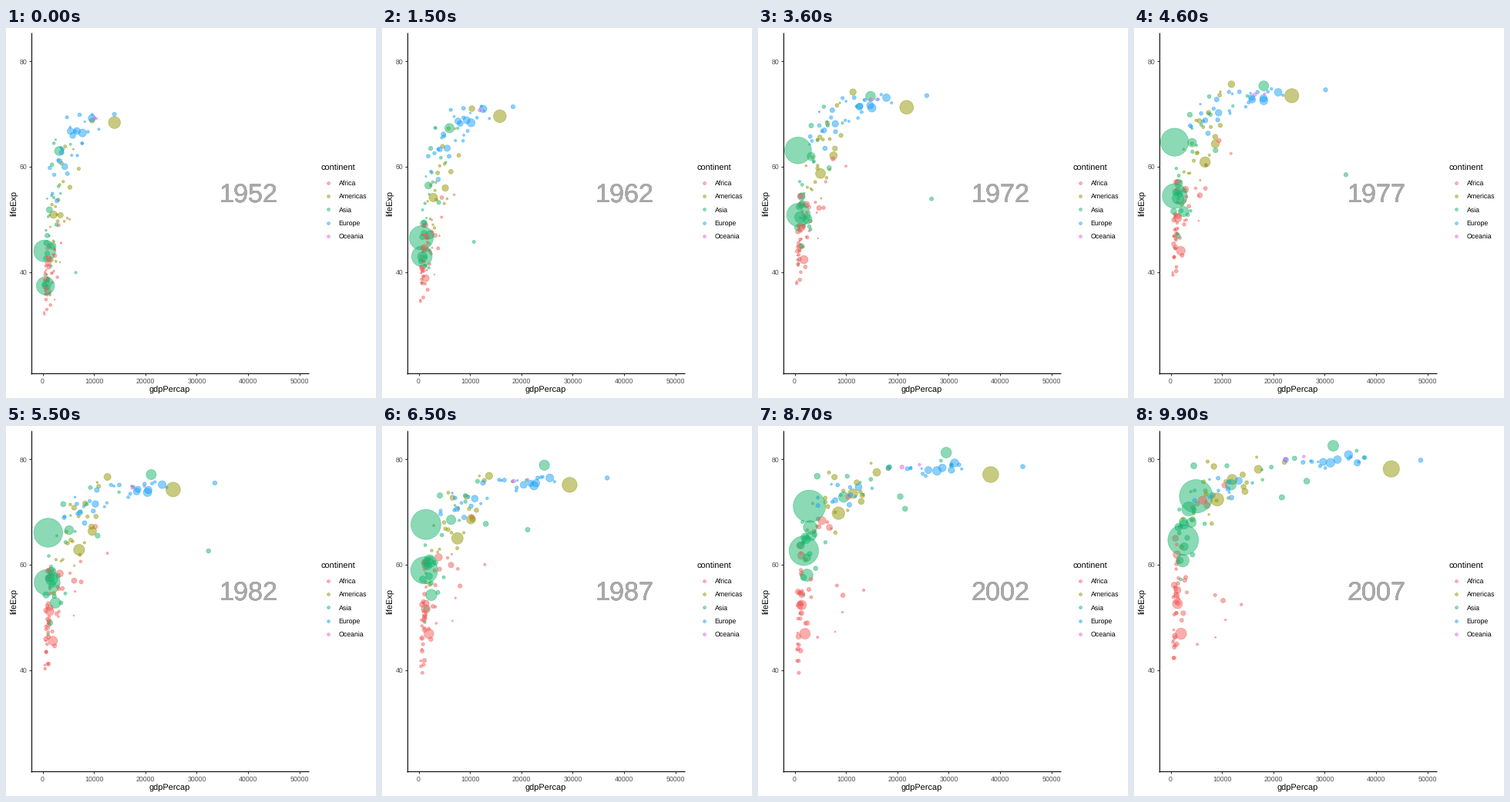
Animation of 480x480 px, one loop 10 s. Source, as a matplotlib script:

```python
import numpy as np
import matplotlib
import matplotlib.pyplot as plt
from matplotlib.animation import FuncAnimation
from matplotlib.colors import to_rgba

matplotlib.rcParams["font.family"] = "Liberation Sans"
matplotlib.rcParams["text.hinting"] = "none"

SIZE, DPI = 480, 72
FRAMES, INTERVAL = 100, 100
START, END, STEP = 1952, 2007, 5
COLORS = {
    "Africa": "#F35E5A",
    "Americas": "#929705",
    "Asia": "#18B56D",
    "Europe": "#1AA0F8",
    "Oceania": "#E55EF1",
}
STROKE = 0.71
MAX_POP = 1319

rng = np.random.default_rng(7)
years = np.linspace(START, END, FRAMES)
progress = (years - START) / (END - START)
bubbles = []


def path(*points):
    """Straight moves between (year, value) points."""
    return np.interp(years, *zip(*points))


def blend(values):
    """Piecewise move through evenly spaced values."""
    return np.interp(progress, np.linspace(0, 1, len(values)), values)


def radius(size):
    return 0.375 * (2.845 * size + 0.945)


def add(region, pops, gdp, life):
    size = 0.1 + 19.9 * np.sqrt(blend(pops) / MAX_POP)
    bubbles.append((region, gdp, life, radius(size)))


def scores(count):
    """Evenly spread, bell-shaped values in random order."""
    q = (np.arange(count) + 0.5) / count
    return rng.permutation(np.log(q / (1 - q)) / 1.7)


def crowd(region, count, gdp, spread, life, life_sd, pops, pop_sd=0.8):
    """Countries scattered round a shared path, slowly trading places."""
    rich, healthy, heavy = scores(count), scores(count), scores(count)
    turn = 0.9 * progress
    for r, h, w in zip(rich, healthy, heavy):
        a = r * np.cos(turn) + rng.normal() * np.sin(turn)
        b = 0.6 * a + 0.8 * (h * np.cos(turn) + rng.normal() * np.sin(turn))
        income = np.exp(blend(np.log(gdp)) + blend(spread) * np.clip(a, -2, 2))
        age = blend(life) + blend(life_sd) * np.clip(b, -1.8, 1.8)
        add(region, np.array(pops) * np.exp(pop_sd * w), income, age)


# The largest bubbles follow their own paths
add("Asia", (556, 1319),
    path((1952, 400), (1977, 741), (1992, 1656), (2002, 3119), (2007, 4959)),
    path((1952, 44), (1957, 50.5), (1962, 44.5), (1967, 58.4), (1972, 63.1), (2007, 73)))
add("Asia", (372, 1110),
    path((1952, 547), (1982, 856), (1997, 1459), (2007, 2452)),
    path((1952, 37.4), (1977, 54.2), (1987, 58.6), (2007, 64.7)))
add("Asia", (82, 223),
    path((1952, 750), (1967, 762), (1992, 2383), (2007, 3541)),
    path((1952, 37.5), (1987, 60.1), (2007, 70.6)))
add("Asia", (86, 127),
    path((1952, 3217), (1962, 6577), (1972, 14779), (1992, 26825), (2007, 31656)),
    path((1952, 63), (1972, 73.4), (1987, 78.7), (2007, 82.6)))
add("Asia", (4, 27.6),
    path((1952, 6460), (1962, 11626), (1977, 34168), (1982, 33693), (1987, 21198), (2007, 21655)),
    path((1952, 39.9), (1972, 53.9), (1987, 66.3), (2007, 72.8)))
add("Americas", (157, 301),
    path((1952, 13990), (1962, 16173), (1972, 21806), (1982, 25010), (2007, 42952)),
    path((1952, 68.4), (1972, 71.3), (1977, 73.4), (2007, 78.2)))
add("Americas", (56, 190),
    path((1952, 2109), (1967, 3430), (1977, 6660), (2007, 9066)),
    path((1952, 50.9), (2007, 72.4)))
add("Americas", (30, 109),
    path((1952, 3478), (1982, 9611), (2007, 11978)),
    path((1952, 50.8), (1967, 60.1), (2007, 76.2)))
add("Africa", (33, 135),
    path((1952, 1077), (1977, 1982), (2007, 2014)),
    path((1952, 36.3), (1987, 46.9), (2007, 46.9)))
add("Africa", (2.5, 8.9),
    path((1952, 493), (2007, 863)),
    path((1952, 40), (1987, 44), (1992, 23.6), (1997, 36.1), (2007, 46.2)))

# Everyone else: values at the start, middle and end
crowd("Africa", 6, (1900, 5000, 7000), (0.35, 0.5, 0.35),
      (43.5, 59, 73.2), (3, 4, 1.3), (7, 23))
crowd("Africa", 6, (2600, 6500, 9500), (0.5, 0.5, 0.4),
      (41, 56.5, 50), (5, 5, 5), (1.2, 4), 1.1)
crowd("Africa", 38, (850, 1150, 1200), (0.5, 0.5, 0.55),
      (38.5, 49, 54), (3.6, 5, 6.5), (3, 11), 0.9)
crowd("Asia", 7, (900, 1600, 3000), (0.5, 0.7, 0.7),
      (43.5, 56.5, 68), (5, 5, 4), (24, 85), 0.5)
crowd("Asia", 7, (2200, 9500, 29000), (0.6, 0.4, 0.3),
      (56, 70, 79), (7, 4, 2), (3, 10))
crowd("Asia", 13, (1200, 2500, 3300), (0.5, 0.6, 0.6),
      (46, 58, 68), (8, 7, 6), (4, 14))
crowd("Americas", 12, (4200, 7500, 11500), (0.45, 0.3, 0.4),
      (58, 69, 76), (6, 4, 2.5), (6, 15))
crowd("Americas", 10, (2500, 4200, 5200), (0.3, 0.35, 0.45),
      (46.5, 62, 71.5), (6, 5, 4.5), (2.2, 8))
crowd("Europe", 4, (7200, 19000, 31000), (0.25, 0.1, 0.07),
      (67.3, 73.6, 80), (1.2, 0.5, 0.5), (50, 65), 0.2)
crowd("Europe", 13, (7200, 17500, 33500), (0.35, 0.3, 0.2),
      (67, 74.3, 79.8), (3, 1.2, 0.8), (7, 9))
crowd("Europe", 13, (3300, 8300, 11500), (0.45, 0.35, 0.45),
      (60.5, 70.5, 75), (4, 1.8, 1.6), (8, 11))
crowd("Oceania", 2, (10300, 19000, 29500), (0.03, 0.1, 0.2),
      (69.2, 74.3, 80.7), (0.2, 0.5, 0.6), (4, 9))

bubbles = [bubbles[i] for i in rng.permutation(len(bubbles))]
region, gdp, life, radii = zip(*bubbles)


def px(value):
    return 47.5 + np.asarray(value) / 150.05


def py(value):
    return 43.4 + (80 - np.asarray(value)) * 6.83


fig = plt.figure(figsize=(SIZE / DPI, SIZE / DPI), dpi=DPI, facecolor="white")
ax = fig.add_axes([0, 0, 1, 1])
ax.set(xlim=(0, SIZE), ylim=(SIZE, 0))
ax.axis("off")

xs, ys, diameters = px(gdp), py(life), 2 * np.array(radii)


def dots(x, y, diameter, names):
    tints = [to_rgba(COLORS[n], 0.5) for n in names]
    return ax.scatter(x, y, s=np.square(diameter), c=tints, edgecolors=tints,
                      linewidths=STROKE, zorder=2)


def line(x, y, color="black"):
    ax.plot(x, y, color=color, lw=1.07, solid_capstyle="butt", zorder=4)


def label(x, y, text, size=8.8, color="black", ha="left", **kw):
    return ax.text(x, y, text, size=size, color=color, ha=ha,
                   va=kw.pop("va", "baseline"), **kw)


cloud = dots(xs[:, 0], ys[:, 0], diameters[:, 0], region)

# Stacked copies give the year its hard edge
year_text = [label(314.2, 226.7, str(START), 34.1, "#A9A9A9", "center", zorder=3)
             for _ in range(10)]

line((32.6, 32.6), (5.5, 448.9))
line((32.1, 393), (448.4, 448.4))
for v in range(0, 50001, 10000):
    line((px(v), px(v)), (448.4, 451.4), "#333333")
    label(px(v), 460.7, str(v), color="#4D4D4D", ha="center")
for v in (40, 60, 80):
    line((29.8, 32.6), (py(v), py(v)), "#333333")
    label(27.7, py(v) + 3.2, str(v), color="#4D4D4D", ha="right")
label(212.5, 473.1, "gdpPercap", 11, ha="center")
label(15.8, 227, "lifeExp", 11, ha="right", va="center", rotation=90)

label(408.7, 185.2, "continent", 11)
for i, name in enumerate(COLORS):
    y = 200.8 + 17.28 * i
    dots([417.8], [y], 2 * radius(1.5), [name])
    label(431.7, y + 3.2, name)


def update(i):
    cloud.set_offsets(np.column_stack((xs[:, i], ys[:, i])))
    cloud.set_sizes(diameters[:, i] ** 2)
    year = START + STEP * round((years[i] - START) / STEP)
    for copy in year_text:
        copy.set_text(str(year))
    return [cloud, *year_text]


anim = FuncAnimation(fig, update, frames=FRAMES, interval=INTERVAL,
                     repeat=True, repeat_delay=0, blit=False)
plt.show()
```
